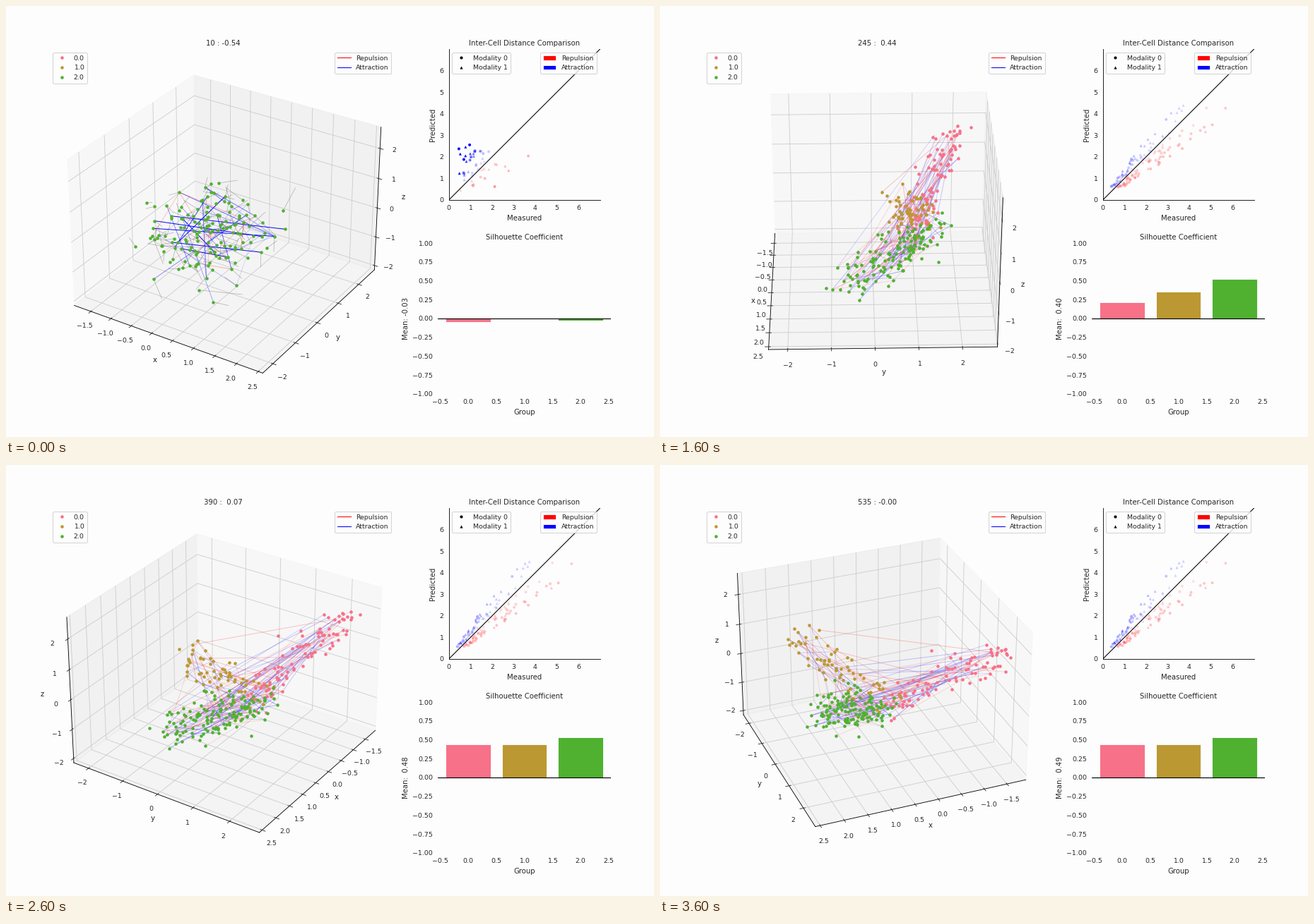
These frames come from a looping animation (917x611 px, 3.8 s). A matplotlib script:

```python
import numpy as np
import matplotlib.pyplot as plt
from matplotlib.animation import FuncAnimation
from matplotlib.lines import Line2D
from matplotlib.patches import Patch
from mpl_toolkits.mplot3d.art3d import Line3DCollection

W, H, DPI = 917, 611, 76.4
FRAMES, INTERVAL = 19, 200
PAPER = "#fdfdfe"
COLORS = ["#f77189", "#bb9832", "#50b131"]
LIMITS = np.array([(-1.92, 2.60), (-2.44, 2.80), (-2.15, 2.70)])
BOX = np.array([1.1905, 1.1905, 0.8929])

plt.rcParams.update({
    "font.family": "DejaVu Sans", "font.size": 9.6,
    "axes.titlesize": 9.6, "axes.titlepad": 5, "axes.labelsize": 9.6,
    "xtick.labelsize": 8.8, "ytick.labelsize": 8.8, "legend.fontsize": 8.8,
    "text.color": ".15", "axes.labelcolor": ".15",
    "xtick.color": ".15", "ytick.color": ".15",
    "grid.color": ".8", "grid.linewidth": 0.8,
    "figure.facecolor": PAPER, "axes.facecolor": PAPER,
})

rng = np.random.default_rng(12)


def logistic(step, mid, width):
    return 1 / (1 + np.exp((mid - step) / width))


def bump(step, mid, width):
    return np.exp(-((step - mid) / width) ** 2)


# ---- cell clouds: one loose ball that settles into three strands ----
BALL = np.array([-0.05, -0.1, -0.06])


class Cloud:
    def __init__(self, n, a, b, sigma, first, last):
        a, b = np.array(a), np.array(b)
        self.axis = b - a
        self.goal = (a + rng.uniform(-0.05, 1.05, (n, 1)) * self.axis
                     + rng.normal(0, sigma, (n, 3)))
        self.start = BALL + rng.normal(0, 1, (n, 3)) * (0.17, 0.17, 0.11)
        self.push = rng.normal(0, 0.06, (n, 3))
        self.birth = rng.uniform(first, last, n)

    def place(self, step):
        """Positions and motion-line tips in box units."""
        k = np.exp((2 - step) / 15)
        pos = self.goal + k * (self.start - self.goal)
        return pos, pos + k * (self.push + 0.35 * (1 - k) * self.axis)


clouds = [
    Cloud(95, (0.04, 0.17, -0.06), (-0.5, 0.44, 0.25), 0.05, 22, 46),
    Cloud(62, (0.09, 0.21, -0.03), (0.5, 0.11, 0.41), 0.055, 3, 46),
    Cloud(142, (0.265, -0.17, -0.25), (0.13, 0.3, -0.02), 0.058, 0, 1),
]
birth = np.concatenate([c.birth for c in clouds])
starts = np.cumsum([0] + [len(c.birth) for c in clouds])


def to_data(box):
    return LIMITS.mean(axis=1) + box * np.ptp(LIMITS, axis=1) / BOX


def positions(step):
    pos, tips = zip(*(c.place(step) for c in clouds))
    return to_data(np.concatenate(pos)), to_data(np.concatenate(tips))


# ---- measured pairs: (group, group, count) ----
PAIRS = [(2, 2, 56), (0, 2, 38), (0, 1, 14), (1, 2, 20), (1, 1, 18), (0, 0, 20)]


def pick(group, n):
    return rng.integers(starts[group], starts[group + 1], n)


def distances(pos):
    return np.linalg.norm(pos[left] - pos[right], axis=1)


left = np.concatenate([pick(a, n) for a, _, n in PAIRS])
right = np.concatenate([pick(b, n) for _, b, n in PAIRS])
apart = distances(positions(110)[0]) > 0.55
left, right = left[apart], right[apart]
pair_birth = np.maximum(birth[left], birth[right])

final = distances(positions(110)[0])
u, v = rng.random((2, len(left)))
pulled = rng.random(len(left)) < 0.5
measured = final / np.where(pulled, 1.08 + 0.42 * u, 0.68 + 0.28 * u)
triangle = pulled ^ (v < 0.12)


def pair_colors(pred):
    ratio = pred / measured
    blue = ratio > 1
    attract = 0.12 + 0.5 * np.maximum(ratio - 1, 0) ** 1.3
    repel = 0.1 + 0.42 * np.maximum(1 - ratio, 0)
    alpha = np.clip(np.where(blue, attract, repel), 0, 1)
    return np.column_stack([~blue, 0 * alpha, blue, alpha])


# ---- readouts ----
def bar_heights(step):
    pink = (0.443 * logistic(step, 49.5, 5.6)
            + 0.06 * bump(step, 20, 8) - 0.045 * bump(step, 2, 8))
    gold = 0.438 * logistic(step, 39.8, 6.3) - 0.139 * bump(step, 20, 8)
    green = 0.618 * logistic(step, 17.2, 7) - 0.088
    return np.array([pink, gold, green])


def score(step):
    return (1.131 * bump(step, 26.18, 23.5) - 0.93 * bump(step, 2, 8)
            + 0.061 * bump(step, 78, 6) - 0.002)


# ---- figure ----
fig = plt.figure(figsize=(W / DPI, H / DPI), dpi=DPI)


def force_patches():
    return [Patch(facecolor=c, edgecolor="w", lw=0.8, label=name)
            for c, name in (("red", "Repulsion"), ("blue", "Attraction"))]


def force_lines():
    return [Line2D([], [], color=c, lw=1, label=name)
            for c, name in (("red", "Repulsion"), ("blue", "Attraction"))]


ax = fig.add_axes([1 / 15, 0.1, 8 / 15, 0.8], projection="3d", computed_zorder=False)
ax.set_xticks(np.arange(-1.5, 2.6, 0.5))
ax.set_yticks(range(-2, 3))
ax.set_zticks(range(-2, 3))
ax.set(xlim=LIMITS[0], ylim=LIMITS[1], zlim=LIMITS[2])
ax.set_xlabel("x", labelpad=0)
ax.set_ylabel("y", labelpad=0)
ax.set_zlabel("z", labelpad=0)

blank = np.zeros((1, 2, 3))
trails = Line3DCollection(blank, colors=[(0.45, 0.45, 0.45, 0.5)], linewidths=0.7, zorder=3)
links = Line3DCollection(blank, linewidths=0.9, zorder=3.5)
ax.add_collection3d(trails)
ax.add_collection3d(links)
dots = [ax.plot([], [], [], "o", ms=4.3, mew=0, color=c, label=f"{i}.0", zorder=4 + i / 10)[0]
        for i, c in enumerate(COLORS)]
ax.add_artist(ax.legend(handles=dots, loc="upper left"))
ax.legend(handles=force_lines(), loc="upper right")
title = fig.text(307.7 / W, 0.9088, "", ha="center", fontsize=9.6)

comp = fig.add_axes([626.7 / W, 0.55, 213.9 / W, 0.35])
comp.set(xlim=(0, 7), ylim=(0, 7), xticks=range(7), yticks=range(7),
         xlabel="Measured", ylabel="Predicted", title="Inter-Cell Distance Comparison")
comp.spines[["top", "right"]].set_visible(False)
comp.tick_params(left=False, bottom=False)
comp.plot([0, 7], [0, 7], color="black", lw=1)
marks = [comp.scatter([], [], s=14, marker=m, linewidths=0, zorder=3) for m in "o^"]
keys = [Line2D([], [], ls="", marker=m, ms=3.9, mew=0, color="black", label=f"Modality {i}")
        for i, m in enumerate("o^")]
comp.add_artist(comp.legend(handles=keys, loc="upper left"))
comp.legend(handles=force_patches(), loc="upper right")

sil = fig.add_axes([2 / 3, 0.1, 4 / 15, 0.35])
bars = sil.bar(range(3), [0] * 3, color=COLORS, edgecolor="w", linewidth=0.8)
sil.axhline(0, color="black", lw=1.1)
sil.set(xlim=(-0.54, 2.54), ylim=(-1, 1), xticks=np.arange(-0.5, 2.6, 0.5),
        yticks=np.linspace(-1, 1, 9), xlabel="Group", title="Silhouette Coefficient")
sil.spines[:].set_visible(False)
sil.tick_params(left=False, bottom=False)


def draw(frame):
    step = int((frame + 0.5) * 5.8)
    ax.view_init(elev=30, azim=-60 + 1.2 * step)
    pos, tips = positions(step)
    shown = birth <= step

    for i, dot in enumerate(dots):
        part = slice(starts[i], starts[i + 1])
        dot.set_data_3d(*pos[part][shown[part]].T)
    trails.set_segments(np.stack([pos[shown], tips[shown]], axis=1))

    live = pair_birth <= step
    pred = distances(pos)
    rgba = pair_colors(pred)
    links.set_segments(np.stack([pos[left[live]], pos[right[live]]], axis=1))
    links.set_color(rgba[live])
    for mark, kind in zip(marks, (~triangle, triangle)):
        keep = live & kind
        mark.set_offsets(np.column_stack([measured, pred])[keep])
        mark.set_facecolors(rgba[keep])

    heights = bar_heights(step)
    for bar, height in zip(bars, heights):
        bar.set_height(height)
    sil.set_ylabel(f"Mean: {heights @ (0.3, 0.2, 0.5): .2f}")
    title.set_text(f"{5 * step} : {score(step): .2f}")
    return []


anim = FuncAnimation(fig, draw, frames=FRAMES, interval=INTERVAL,
                     init_func=lambda: [], repeat=True, repeat_delay=0)
plt.show()
```
